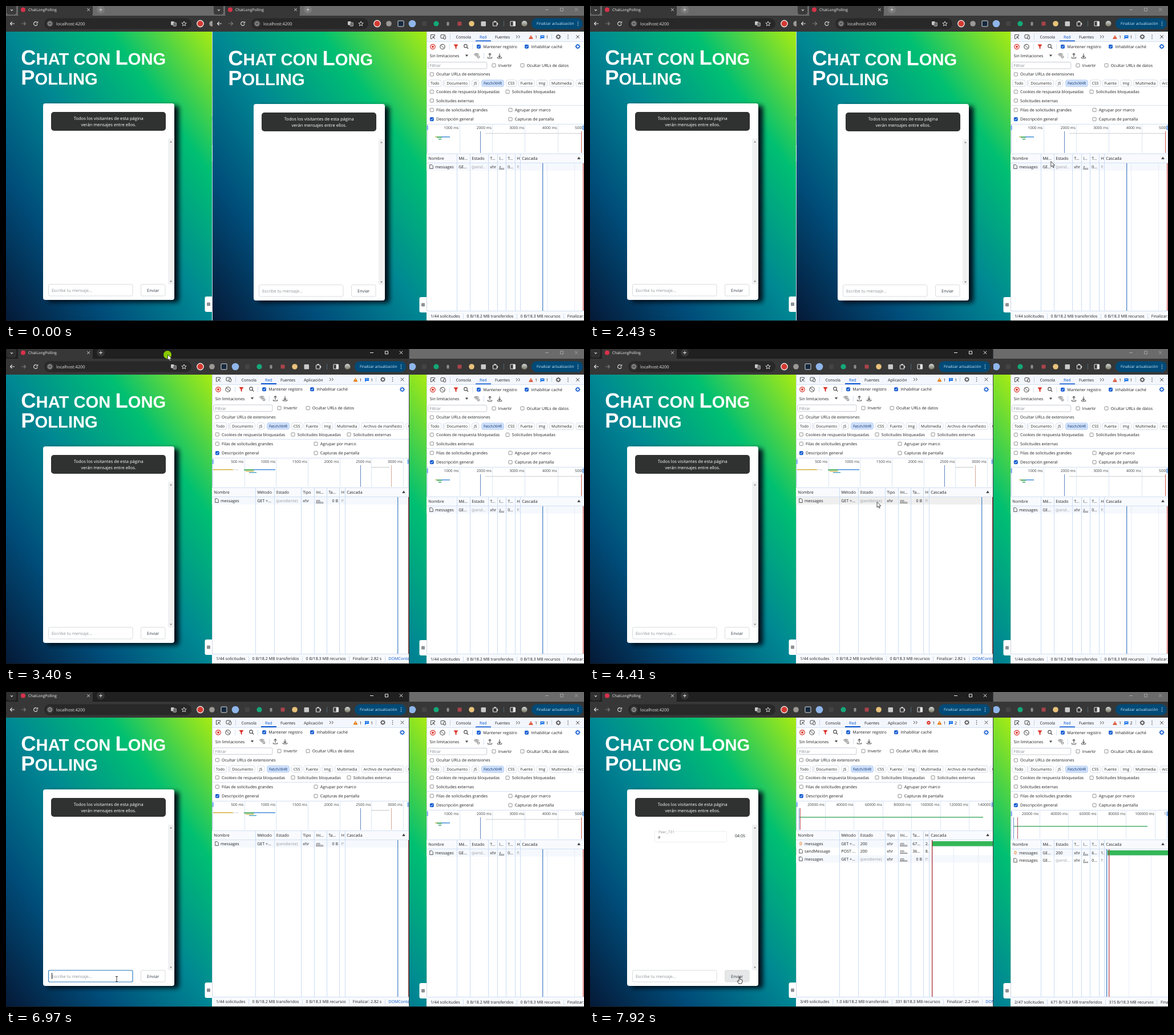
Animation of 1013 by 553 pixels, one loop 8 s. Source, as an HTML page with a canvas:

```html
<!DOCTYPE html>
<html lang="es">
<head>
<meta charset="utf-8">
<title>Chat</title>
<style>
html, body { margin: 0; width: 100%; height: 100%; overflow: hidden; background: #111; }
canvas { display: block; width: 1013px; height: 553px; }
</style>
</head>
<body>
<canvas id="stage" width="1013" height="553"></canvas>
<script>
const g = document.getElementById('stage').getContext('2d');
const UI = '"Open Sans", "Noto Sans", sans-serif';
const INK = '#202124', MUTED = '#9a9da1', ICON = '#474747', BLUE = '#0b57d0', RULE = '#d3e0f2';
const LOOP = 8000, FOCUS = 3400, INPUT = 5915, TYPE = 7100, SEND = 7580, LEFT_DONE = 7640, RIGHT_DONE = 7780;

// tab, tool, card: shifts of the browser parts; dx, rx: shifts of the left and right panel items
const LEFT = {
  left: 0, right: 706, tab: 0, tool: 0, card: 0, dev: 361, dx: 0, rx: 0, dy: 0, top: 191, col2: 543,
  cols: [437, 470.5, 517, 540, 562, 584.5, 594],
  heads: ['Nombre', 'Método', 'Estado', 'Tipo', 'Ini…', 'Ta…', 'H', 'Cascada'],
  before: {
    tick: [418, 55.7, 500], msgs: 1, grid: [], marks: [[687, '#4f86c6'], [705.5, '#8c3a3a']],
    rows: [['messages', 'GET +…', '(pendiente)', 'xhr', 'zo…', '0 B', 'P.']],
    status: ['1/44 solicitudes', '0 B/18.2 MB transferidos', '0 B/18.3 MB recursos', 'Finalizar: 2.82 s', 'DOMContentLoaded']
  },
  after: {
    tick: [412.5, 50.4, 20000], msgs: 2, error: true, grid: [637, 680], marks: [[599.5, '#a8323a']], bar: 600,
    rows: [['messages', 'GET +…', '200', 'xhr', 'zo…', '67…', '2.'],
           ['sendMessage', 'POST …', '200', 'xhr', 'zo…', '36…', '8.'],
           ['messages', 'GET +…', '(pendiente)', 'xhr', 'zo…', '0 B', 'P.']],
    status: ['3/49 solicitudes', '1.0 kB/18.2 MB transferidos', '331 B/18.3 MB recursos', 'Finalizar: 2.2 min', 'DOMContentLoaded']
  }
};
const RIGHT = {
  left: 362, right: 1013, tab: 363, tool: 310, card: 369, dev: 737, dx: 376, rx: 307.5, dy: 1, top: 207, col2: 884,
  cols: [790, 813, 845, 861, 876, 892, 901],
  heads: ['Nombre', 'Mé…', 'Estado', 'T…', 'I…', 'T…', 'H', 'Cascada'],
  before: {
    tick: [795, 57.4, 1000], msgs: 1, grid: [948, 996], marks: [[941, '#4f86c6'], [1012, '#c0504d']],
    rows: [['messages', 'GE…', '(pend…', 'xhr', 'z…', '0…', 'P.']],
    status: ['1/44 solicitudes', '0 B/18.2 MB transferidos', '0 B/18.3 MB recursos', 'Finalizar: 5.01 s']
  },
  after: {
    tick: [788, 50.6, 20000], msgs: 2, grid: [944, 983], marks: [[906, '#3f77c4'], [910, '#b8414a']], bar: 907,
    rows: [['messages', 'GE…', '200', 'xhr', 'z…', '6…', '1.'],
           ['messages', 'GE…', '(pend…', 'xhr', 'z…', '0…', 'P.']],
    status: ['2/47 solicitudes', '671 B/18.2 MB transferidos', '315 B/18.3 MB recursos', 'Finalizar: 1.8 min']
  }
};

// --- basic shapes ---
function text(s, x, y, color = INK, size = 7.1, align = 'left', weight = 400) {
  g.font = `${weight} ${size}px ${UI}`;
  g.textAlign = align;
  g.fillStyle = color;
  g.fillText(s, x, y + size * .355);
}
function smallCaps(line, x, y, size) {
  g.fillStyle = '#fff';
  g.textAlign = 'left';
  for (const run of line.match(/[A-Z]|[^A-Z]+/g)) {
    const big = run !== run.toLowerCase();
    g.font = `bold ${big ? size : size * .8}px "Liberation Sans", Arial, sans-serif`;
    g.fillText(run.toUpperCase(), x, y);
    x += g.measureText(run.toUpperCase()).width;
  }
}
function rect(x, y, w, h, color) { g.fillStyle = color; g.fillRect(x, y, w, h); }
function round(x, y, w, h, r, fill, stroke, lw = 1) {
  g.beginPath(); g.roundRect(x, y, w, h, r);
  if (fill) { g.fillStyle = fill; g.fill(); }
  if (stroke) { g.strokeStyle = stroke; g.lineWidth = lw; g.stroke(); }
}
function dot(x, y, r, fill, stroke, lw = 1) { round(x - r, y - r, 2 * r, 2 * r, r, fill, stroke, lw); }
function path(pts, x, y, color, lw = 1, fill) {
  g.beginPath();
  for (let i = 0; i < pts.length; i += 2) g.lineTo(x + pts[i], y + pts[i + 1]);
  if (fill) { g.closePath(); g.fillStyle = fill; g.fill(); }
  if (color) { g.strokeStyle = color; g.lineWidth = lw; g.stroke(); }
}
// full-width lines sit on whole pixels
const snap = (v, w) => w < 1 ? v - w / 2 : Math.round(v - w / 2);
const vline = (x, y, h, c, w = 1) => rect(snap(x, w), y, w, h, c);
const hline = (x, y, w, c, h = 1) => rect(x, snap(y, h), w, h, c);
function arc(x, y, r, a, b, color, lw = 1) {
  g.beginPath(); g.arc(x, y, r, a, b);
  g.strokeStyle = color; g.lineWidth = lw; g.stroke();
}
function cross(x, y, r, c) {
  path([-r, -r, r, r], x, y, c);
  path([r, -r, -r, r], x, y, c);
}
function dots(x, y, c) { for (const d of [-3, 0, 3]) dot(x, y + d, .8, c); }
function gear(x, y, c) {
  dot(x, y, 2.7, null, c, 1.2);
  for (let i = 0; i < 8; i++) {
    const a = i * Math.PI / 4, u = Math.cos(a), v = Math.sin(a);
    path([3 * u, 3 * v, 4.4 * u, 4.4 * v], x, y, c, 1.3);
  }
}
function check(x, y, label, on) {
  round(x - 3, y - 3, 6, 6, 1, on ? BLUE : '#fff', on ? BLUE : '#767676', .8);
  if (on) path([-1.9, 0, -.5, 1.5, 2, -1.6], x, y, '#fff', 1);
  text(label, x + 7.8, y);
}

// --- browser frame ---
function drawBar(w, active) {
  const strip = active ? '#202020' : '#6b6b6b', tool = '#373737', light = '#e3e3e3';
  const x = w.tab, r = w.tool;
  rect(w.left, 0, w.right - w.left, 18, strip);
  rect(w.left, 17, w.right - w.left, 28, tool);
  round(x + 1, -2, 17, 17, 4, active ? '#303030' : '#3a3a3a');
  path([-2, -1, 0, 1.2, 2, -1], x + 10, 7, light, 1.1);
  round(x + 21, -4, 131, 22, [0, 0, 4, 4], tool);
  dot(x + 30, 6.5, 4, '#d8324a');
  text('ChatLongPolling', x + 39, 7, '#f2f2f2', 6.6);
  cross(x + 144.5, 6.5, 2.2, light);
  const plus = active ? light : '#d0d0d0';
  dot(x + 166, 6.5, 7, active ? '#343434' : '#7a7a7a');
  path([-3, 0, 3, 0], x + 166, 6.5, plus);
  path([0, -3, 0, 3], x + 166, 6.5, plus);

  path([4, 0, -3.5, 0, -.5, -3, -3.5, 0, -.5, 3], x + 11, 31, light, 1.1);
  path([-4, 0, 3.5, 0, .5, -3, 3.5, 0, .5, 3], x + 31, 31, '#7c7c7c', 1.1);
  arc(x + 52, 31, 3.3, .3, 5.4, light, 1.1);
  path([3.6, -4, 3.6, -1, .8, -1], x + 52, 31, light, 1);
  round(x + 67, 21.5, 258 + r - x, 19, 9.5, '#282828');
  dot(x + 77, 31, 6.5, '#3c3c3c');
  dot(x + 77, 31, 3.4, null, light, .9);
  vline(x + 77, 30.3, 2.6, light, .9);
  vline(x + 77, 28.8, .9, light, .9);
  text('localhost:4200', x + 88, 31, light, 7.5);

  round(r + 289, 27, 5.5, 6.5, 1, '#c8c8c8');
  round(r + 293, 29, 5.5, 6.5, 1, '#6a6a6a', '#c8c8c8', .7);
  const star = [];
  for (let i = 0; i <= 10; i++) {
    const q = i % 2 ? 1.9 : 4.4, a = i * Math.PI / 5;
    star.push(q * Math.sin(a), -q * Math.cos(a));
  }
  path(star, r + 312, 31.3, light, .9);
  dot(r + 340.5, 31, 5.7, '#d33a32', '#f0e4e2', 1.4);
  dot(r + 361, 31, 4.8, '#9c9894');
  round(r + 377, 26, 10, 10, 1, '#16283c', '#d8dde2', 1);
  dot(r + 402, 31, 6.3, '#8fb6ea');
  round(r + 419, 27, 8, 8, 1, '#444');
  dot(r + 444, 31, 4.6, '#14a878');
  round(r + 462.5, 28, 4, 6.5, 1, '#8d8d8d');
  round(r + 481.5, 27.5, 7, 7, 1, '#a8434b');
  dot(r + 506, 31, 4.8, '#e8c27a');
  round(r + 522.5, 27, 8.5, 8.5, 1, '#c9c9c9');
  round(r + 543.5, 28, 7, 7, 1, null, light, 1.2);
  dot(r + 547, 27.3, 1.4, light);
  dot(r + 551, 31.5, 1.4, light);
  vline(r + 562.5, 26, 10, '#4c6577');
  round(r + 574, 27, 8.5, 8, 1, null, light, 1.1);
  rect(r + 578.5, 27, 4, 8, light);
  const sky = g.createLinearGradient(0, 26, 0, 36);
  sky.addColorStop(0, '#cfd6d6'); sky.addColorStop(1, '#77745f');
  dot(r + 598.5, 31, 5, sky);
  round(r + 611, 21.5, 90, 19, 9.5, '#004a77');
  text('Finalizar actualización', r + 620, 31, '#d3edff', 6.45, 'left', 500);
  dots(r + 692.5, 31, '#d3edff');
  const ctl = active ? '#f0f0f0' : '#a6a6a6', k = w.tool ? 307 : 0;
  hline(k + 638, 6.5, 6, ctl);
  round(k + 664.5, 3.8, 5, 5, 0, null, ctl);
  cross(k + 692.5, 6.3, 2.6, ctl);
}

// --- chat page ---
function drawPage(w, s) {
  const x = w.left, wd = w.dev - x, h = 507, cx = x + wd / 2, cy = 45 + h / 2;
  const k = wd * h / (wd * wd + h * h);
  const bg = g.createLinearGradient(cx - h * k, cy + wd * k, cx + h * k, cy - wd * k);
  ['#051937', '#004d7a', '#008793', '#00bf72', '#a8eb12'].forEach((c, i) => bg.addColorStop(i / 4, c));
  rect(x, 45, wd, h, bg);

  smallCaps('Chat con Long', w.tab + 26.2, 103 + w.dy, 36.5);
  smallCaps('Polling', w.tab + 26.2, 138 + w.dy, 36.5);

  g.save();
  g.translate(w.card, w.dy);
  g.save();
  g.shadowColor = 'rgba(0,10,20,.98)';
  g.shadowBlur = 8; g.shadowOffsetX = 8; g.shadowOffsetY = 4;
  round(65, 171, 230, 345, 4, '#fff');
  g.restore();
  round(79, 186, 201, 33, 5, '#2f3231');
  text('Todos los visitantes de esta página', 179.7, 197.5, '#fff', 7.6, 'center');
  text('verán mensajes entre ellos.', 179.7, 208.5, '#fff', 7.6, 'center');
  rect(284, 233, 10, 255.5, '#f1f1f1');
  path([-2, 1, 2, 1, 0, -1.4], 289, 238.5, null, 0, '#868686');
  path([-2, -1, 2, -1, 0, 1.4], 289, 483.5, null, 0, '#868686');
  if (s.sent) {
    g.setLineDash([1, 1]);
    round(113.5, 244.5, 126, 19, 2, null, '#cfd2d5', .8);
    g.setLineDash([]);
    rect(118, 242, 31, 5, '#fff');
    text('Peer_731', 120, 245.3, '#8b9095', 6.5);
    text('a', 119, 254.5, '#33373b', 7.5);
    text('04:05', 254, 252, '#212529', 7.1);
  }
  round(74.5, 488.5, 147.5, 20.5, 2.5, '#fff', s.focus ? '#2f7fc1' : '#d9dcdf', s.focus ? 1.2 : 1);
  if (s.typed) text('a', 80.5, 499, '#33373b', 7.5);
  else text('Escribe tu mensaje...', 80, 499, '#8f9499', 7.4);
  if (s.caret) vline((s.typed ? 85 : 80.5), 493, 11, '#222');
  round(236.5, 488.5, 42.5, 20.5, 2.5, s.hover ? '#e6e7e8' : '#fff', s.hover ? '#dcdee0' : '#d9dcdf');
  text('Enviar', 257.7, 499, '#33404d', 7.4, 'center');
  g.restore();

  const d = w.dev;
  round(d - 12.5, 510 + w.dy, 14, 27, [3, 0, 0, 3], '#fff');
  round(d - 9, 520.5 + w.dy, 6, 6, 1, '#8d9296');
}

// --- developer panel ---
function drawTools(w, n, hover) {
  const L = w.dev, R = w.right, W = R - L;
  rect(L, 45, W, 507, '#fff');
  rect(L, 45, W, 17, '#f3f6fc');
  vline(L + .5, 45, 507, '#cdd6e3');
  g.save();
  g.translate(w.dx, w.dy * .5);
  path([3.5, -1, 3.5, -3.5, -3.5, -3.5, -3.5, 3.5, -1, 3.5], 372, 53.5, ICON);
  path([4, 4, 0, 0, 3, 0, 0, 0, 0, 3], 372, 53.5, ICON);
  round(386, 50, 7.5, 6, 1, null, ICON);
  round(391, 52, 3.5, 5.5, 1, '#f3f6fc', ICON);
  vline(402.5, 49, 9, '#c9d3e2');
  text('Consola', 412.5, 54);
  text('Red', 454, 54, BLUE);
  rect(447, 60, 27, 2, BLUE);
  text('Fuentes', 481, 54);
  if (!w.dx) text('Aplicación', 522, 54);
  const mx = w.dx ? 521 : 570;
  for (const d of [-3, 1]) path([0, -2.5, 2.6, 0, 0, 2.5], mx + d, 53.5, ICON);

  dot(372, 71, 4.2, null, '#d93025', 1.2);
  rect(370.3, 69.3, 3.4, 3.4, '#d93025');
  dot(389, 71, 4.2, null, ICON, 1.1);
  path([-3, -3, 3, 3], 389, 71, ICON);
  vline(401, 66, 10, RULE);
  path([-4, -4, 4, -4, 1, 0, 1, 4, -1, 3, -1, 0], 412.5, 71, null, 0, '#d93025');
  dot(429.5, 69.7, 2.8, null, ICON, 1.1);
  path([2, 2, 4.6, 4.8], 429.5, 69.7, ICON, 1.2);
  vline(441, 66, 10, RULE);
  check(452.5, 70.7, 'Mantener registro', true);
  check(536.5, 70.7, 'Inhabilitar caché', true);

  text('Sin limitaciones', 366.8, 87);
  path([-2.6, -1.6, 2.6, -1.6, 0, 2], 431.5, 86.5, null, 0, ICON);
  for (const q of [2, 4, 6]) arc(448.5, 89, q, -2.4, -.75, ICON, .9);
  dot(452, 89, 1.8, '#fff', ICON, .8);
  vline(461, 82, 10, RULE);
  for (const [x, d] of [[472, 1], [489, -1]]) {
    path([0, 3 * d - 1, 0, -3 * d - 1], x, 87, ICON, 1.1);
    path([-2.2, -1.2 * d - 1, 0, -3.4 * d - 1, 2.2, -1.2 * d - 1], x, 87, ICON, 1.1);
    path([-3.6, 2, -3.6, 4, 3.6, 4, 3.6, 2], x, 87, ICON);
  }
  round(363.8, 98, 103, 11.5, 2, '#fff', '#b9bfc9', .8);
  text('Filtrar', 366.5, 104, '#80868b');
  check(479, 103.7, 'Invertir');
  check(529, 103.7, 'Ocultar URLs de datos');
  check(370.3, 119.4, 'Ocultar URLs de extensiones');

  const chips = [['Todo', 375.7], ['Documento', 414.6], ['JS', 446.7], ['Fetch/XHR', 477], ['CSS', 509.6], ['Fuente', 536.2],
    ['Img', 563.3], ['Multimedia', 597.8], ['Archivo de manifiesto', 660.2], ['Wasm', 714]];
  for (const [s, x] of chips) {
    g.font = `500 6.7px ${UI}`;
    const cw = g.measureText(s).width + 7, on = s === 'Fetch/XHR';
    round(x - cw / 2, 129.3, cw, 11.8, 3.5, on ? '#cfe0fb' : '#fff', on ? '#b4cdf3' : '#ccd5e2', .8);
    text(s, x, 135.2, on ? '#0a3069' : INK, 6.7, 'center', 500);
  }
  vline(390, 130, 11, '#c9d3e2');
  check(370.3, 150, 'Cookies de respuesta bloqueadas');
  check(503, 150, 'Solicitudes bloqueadas');
  if (w.dx) check(370.3, 165.5, 'Solicitudes externas');
  else check(601, 150, 'Solicitudes externas');
  g.restore();

  // right-hand group of the header
  const r = w.rx, y = 54 + w.dy * .5;
  if (n.error) {
    dot(593.5, y, 3.2, '#d93025');
    cross(593.5, y, 1.2, '#fff');
    text('1', 600.5, y);
  }
  path([0, -3.4, 3.9, 3.2, -3.9, 3.2], r + 612.5, y, null, 0, w.dx ? '#d9482b' : '#e37400');
  vline(r + 612.5, y - 1.2, 2.4, '#fff', .9);
  text('1', r + 619.5, y);
  path([-3.5, -3, 3.5, -3, 3.5, 2, -1.5, 2, -3.5, 4], r + 632.5, y, null, 0, '#1a73e8');
  hline(r + 630.5, y - 1, 4, '#fff', .8);
  text(n.msgs, r + 639, y);
  vline(r + 648.5, 49, 9, '#c9d3e2');
  gear(r + 660.5, y - .5, ICON);
  dots(r + 677.5, y - .5, ICON);
  cross(r + 694.5, y - .5, 2.8, ICON);
  gear(r + 694.5, 71, BLUE);

  const T = w.top;
  hline(L, 62, W, RULE);
  hline(L, T - 32.5, W, RULE);
  check(w.dx + 370.3, T - 24.6, 'Filas de solicitudes grandes');
  check(w.col2, T - 24.6, 'Agrupar por marco');
  check(w.dx + 370.3, T - 8.3, 'Descripción general', true);
  check(w.col2, T - 8.3, 'Capturas de pantalla');
  drawOverview(w, n, L, T, W);
  drawTable(w, n, L, R, T + 52, hover);

  const sy = 543.5 + w.dy * .6;
  rect(L, 535, W, 17, '#f8fafd');
  hline(L, 535.5, W, RULE);
  let x = L + 7;
  n.status.forEach((s, i) => {
    if (i) vline(x - 6, sy - 4, 9, RULE);
    text(s, x, sy, i === 4 ? BLUE : INK);
    x += g.measureText(s).width + 12;
  });
}

function drawOverview(w, n, L, T, W) {
  const [first, step, unit] = n.tick, isLeft = !w.dx;
  hline(L, T, W, RULE);
  for (let i = 0; i < 8; i++) {
    const x = first + i * step;
    vline(x, T, 51, '#dbe6f5');
    text(`${unit * (i + 1)} ms`, x - 1.5, T + 7, '#3c4043', 6.6, 'right');
  }
  if (n.bar) {
    hline(L + 5, T + 28.5, isLeft ? 323 : 235, '#57b576', 1.6);
    vline(L + 5, T + 13, 38, '#6b8fc9');
    vline(isLeft ? 368.5 : 749.5, T + 13, 38, '#b8505a');
  } else if (isLeft) {
    hline(362, 212, 36, '#d8b548', 1.6);
    for (const x of [399, 402, 405]) rect(x, 211.5, 1.6, 1.2, '#b9bdc4');
    hline(417, 212.5, 18, '#5fb878', 2.5);
    hline(420, 215, 14, '#e0b94f', 1.3);
    hline(426, 217, 13, '#5fa9c8', 1.6);
    hline(434, 212, 38, '#4f93dc', 1.6);
    hline(640, 208, 32, '#d2d4d8', 1.4);
    vline(621.5, 204, 38, '#5d86c4');
    vline(675, 204, 38, '#d4a795');
  } else {
    hline(752, 229.5, 5, '#c9b54c', 1.4);
    hline(755, 230.5, 9, '#5fb878', 2.6);
    hline(758, 233.5, 5, '#63b58c', 1.8);
    hline(763, 230, 15, '#4f93dc', 1.6);
    hline(840, 224, 169, '#d2d4d8', 1.2);
    vline(831.5, 220, 38, '#5d86c4');
    vline(1008.5, 220, 38, '#cf5148');
  }
  for (const x of [L + 1.5, L + W - 1.5]) {
    vline(x, T, 51, '#cfe0f7');
    round(x - 1, T + 2.5, 2.2, 8.5, 1.1, '#6ba4ec');
  }
}

function drawTable(w, n, L, R, H, hover) {
  const c = w.cols;
  rect(L, H, R - L, 16, '#f8fafd');
  n.rows.forEach((row, i) => {
    const y = H + 16.5 + i * 13.4;
    if (hover && !i) rect(L, y, R - L, 13.4, '#efefef');
    else if (i % 2 === 0) rect(L, y, R - L, 13.4, '#f5f8fd');
  });
  hline(L, H, R - L, RULE);
  hline(L, H + 16.5, R - L, RULE);
  for (const x of n.grid) vline(x, H + 17, 519 - H, '#e6edf7');
  for (const x of c) vline(x, H, 535 - H, '#cadcf5');
  w.heads.forEach((s, i) => text(s, i ? c[i - 1] + 3.2 : L + 3.3, H + 8.2));
  path([-2.8, 2, 2.8, 2, 0, -2.4], R - 9, H + 8, null, 0, ICON);

  n.rows.forEach((row, i) => {
    const y = H + 23.4 + i * 13.4, pending = row[2][0] === '(';
    if (row[2] === '200' && !i) text('{}', L + 8.5, y - .5, '#e8710a', 7, 'center', 600);
    else path([-2.8, -3.4, .8, -3.4, 2.8, -1.2, 2.8, 3.4, -2.8, 3.4, -2.8, -3.4], L + 8.5, y - .3, ICON, .9);
    text(row[0], L + 15, y);
    for (let k = 1; k < 7; k++) {
      const grey = pending && (k === 2 || k === 6), x = c[k - 1] + 3.2;
      if (row[k] === '0 B') text('0 B', c[5] - 2.5, y, INK, 7.1, 'right');
      else text(row[k], x, y, grey ? MUTED : INK);
      if (k === 4) hline(x, y + 3.8, g.measureText(row[k]).width, INK, .7);
    }
  });
  if (n.bar) rect(n.bar, H + 19, R - n.bar, 8.6, '#33b757');
  for (const [x, col] of n.marks) vline(x, H + 17, 519 - H, col, 1.3);
}

// --- pointer ---
// start, end, steps, from, to, control point
const MOVES = [
  [70, 840, 13, [987, 550], [851, 326], [705, 440]],
  [890, 1030, 3, [851, 326], [832, 293]],
  [1230, 1300, 2, [832, 293], [825, 282]],
  [2430, 2980, 9, [825, 282], [324, 12]],
  [3130, 3200, 2, [287, 8], [283.5, 10]],
  [3460, 4200, 12, [283.5, 10], [508, 266]],
  [4270, 4410, 3, [508, 266], [503, 268.5]],
  [5460, 5980, 9, [503, 268.5], [194, 504]],
  [7040, 7440, 7, [194, 504], [262, 500]]
];
function pointer(t) {
  if (t < 70 || (t >= 2980 && t < 3130)) return null;
  const [a, b, n, p, q, m] = MOVES.findLast(v => t >= v[0]);
  const k = Math.min(n, Math.floor((t - a) / (b - a) * (n - 1) + .001) + 1) / n;
  const u = k * k * (3 - 2 * k);
  return [0, 1].map(i => {
    const c = m ? m[i] : (p[i] + q[i]) / 2;
    return p[i] * (1 - u) ** 2 + 2 * c * u * (1 - u) + q[i] * u * u;
  });
}
const ARROW = [0, 0, 0, 9.6, 2.2, 7.6, 3.8, 11, 5.3, 10.3, 3.8, 7.1, 6.8, 6.9, 0, 0];
function drawPointer([x, y], kind) {
  if (kind === 'text') {
    path([-2, -4.5, 2, -4.5], x, y, '#222', .9);
    path([0, -4.5, 0, 4.5], x, y, '#222', .9);
    path([-2, 4.5, 2, 4.5], x, y, '#222', .9);
  } else if (kind === 'hand') {
    path([-.8, 0, .8, 0, 1, 4.4, 4.8, 5.2, 4.8, 9, 3.6, 12, -1.2, 12, -4, 7.6, -3, 6.6, -.9, 8, -.8, 0], x, y, '#222', .9, '#fff');
  } else path(ARROW, x, y, '#333', .9, '#fff');
}
function tooltip(x, y) {
  round(x + .5, y + .5, 44, 13.5, 1, '#fff', '#9b9b9b', .8);
  text('(pendiente)', x + 3, y + 7.2, '#575757');
}

function drawWindow(w, active, net, page, hover) {
  g.save();
  g.beginPath(); g.rect(w.left, 0, w.right - w.left, 553); g.clip();
  drawPage(w, page);
  drawTools(w, net, hover);
  drawBar(w, active);
  rect(w.left, 552, w.right - w.left, 1, '#161616');
  g.restore();
}

function draw(t) {
  const p = pointer(t), front = t >= FOCUS;
  const within = (x0, y0, x1, y1) => p && p[0] > x0 && p[0] < x1 && p[1] > y0 && p[1] < y1;
  const overButton = front && within(236, 488, 279, 510);
  const overInput = front && within(74, 488, 222, 510);
  const focus = t >= INPUT && t < SEND;
  const page = {
    focus, sent: t >= LEFT_DONE, hover: overButton,
    typed: t >= TYPE && t < LEFT_DONE,
    caret: focus && !(t >= 6440 && t < 6970)
  };
  const leftNet = t < LEFT_DONE ? LEFT.before : LEFT.after;
  const rightNet = t < RIGHT_DONE ? RIGHT.before : RIGHT.after;
  const showLeft = () => drawWindow(LEFT, front, leftNet, page, front && within(361, 260, 706, 273));
  const showRight = () => drawWindow(RIGHT, false, rightNet, {}, !front && within(737, 276, 1013, 290));

  g.clearRect(0, 0, 1013, 553);
  if (front) {
    showRight();
    showLeft();
    vline(706.5, 0, 553, '#3a3d42');
  } else {
    showLeft();
    showRight();
  }

  if (t >= 1830 && t < 2430) tooltip(830, 290);
  if (t >= 4930 && t < 5460) tooltip(508, 277);
  if (t >= 2920 && t < FOCUS) path(ARROW, 387, 46, null, 0, 'rgba(140,140,130,.85)');
  const pressed = [FOCUS, INPUT, SEND].some(c => t >= c && t < c + 120);
  if (p && pressed) dot(p[0] - .5, p[1], 7, '#86c800');
  if (p) drawPointer(p, overButton ? 'hand' : overInput ? 'text' : 'arrow');
}

g.textRendering = 'geometricPrecision';
g.lineJoin = 'round';
function frame() {
  draw(performance.now() % LOOP);
  requestAnimationFrame(frame);
}
frame();
</script>
</body>
</html>
```
